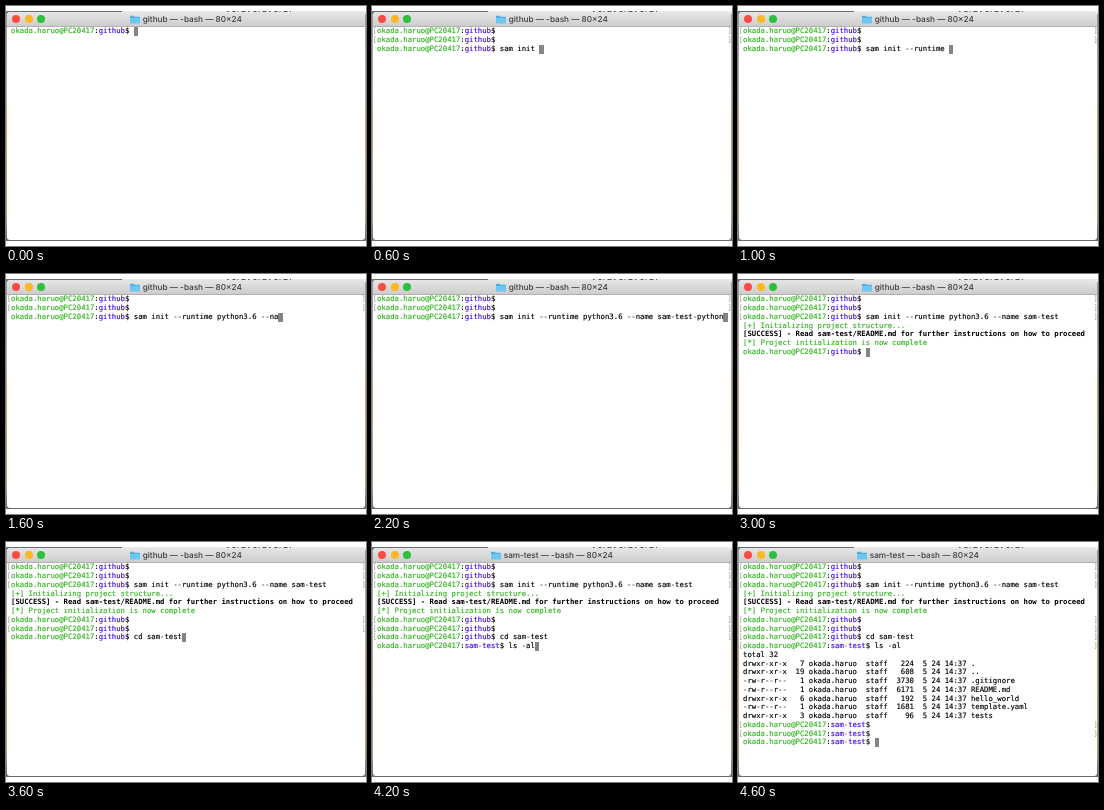
Recreate the animation shown at these times as an HTML page. Size 360 by 240 pixels, loop 4.8 s.

```html
<!DOCTYPE html>
<html lang="en">
<head>
<meta charset="utf-8">
<title>Terminal</title>
<style>
  html, body { margin: 0; width: 100%; height: 100%; overflow: hidden; background: #fff; }
  body { text-rendering: geometricPrecision; }
  div, p, svg { position: absolute; margin: 0; }
  #desk { left: 0; top: 5px; width: 360px; height: 230px;
    background: linear-gradient(#9a9a9a, #b3aca3 35%, #c2a27c 45%, #b59c7e 90%, #6d6a68 99%); }
  #strip { left: 0; top: 5px; width: 360px; height: 3px;
    background: linear-gradient(90deg, #6a6d70 116px, #e9e9e9 116px); }
  #win { left: 1px; top: 6px; width: 358px; height: 228px; background: #fff;
    border-radius: 3px; overflow: hidden; }
  #bar { left: 0; top: 0; width: 358px; height: 14px; border-bottom: .7px solid #b0b0b0;
    background: linear-gradient(#e6e6e6, #cdcdcd);
    display: flex; align-items: center; justify-content: center; gap: 2.5px;
    font: 500 8.2px Inter, Roboto, sans-serif; color: #3c3c3c; white-space: pre; }
  #bar svg { position: static; }
  .light { width: 8.4px; height: 8.4px; top: 2.8px; border-radius: 50%; }
  #term { left: 5px; top: 21.4px; width: 351.2px; color: #000;
    font: 7.292px/8.75px "DejaVu Sans Mono", monospace; white-space: pre;
    -webkit-text-stroke: .15px; }
  #term p { position: relative; height: 8.75px; }
  .done::before, .done::after { position: absolute; top: 0; color: #999; -webkit-text-stroke: 0; }
  .done::before { content: "["; left: -4.39px; }
  .done::after { content: "]"; left: 350.6px; }
  .g { color: #2fb41d; }
  .d { color: #400bd9; }
  #term b { -webkit-text-stroke: 0; }
  #term i { display: inline-block; width: 4.39px; height: 8.75px; vertical-align: top; background: #848484; }
</style>
</head>
<body>
<div id="desk"></div>
<div id="strip"></div>
<svg width="360" height="8" style="left:0;top:0">
  <path d="M221 5.6H285" stroke="#555" stroke-width="1.2" stroke-dasharray="1.5 4 3 2 1 3 4 2.5"/>
</svg>
<div id="win">
  <div id="bar">
    <div class="light" style="left:4.9px;background:#fb4b45"></div>
    <div class="light" style="left:17.5px;background:#fdb725"></div>
    <div class="light" style="left:30.1px;background:#2dc03c"></div>
    <svg width="10" height="9" viewBox="0 0 10 9">
      <path d="M0 1.5Q0 .8 .7 .8H3.6L4.6 1.8H9.3Q10 1.8 10 2.5V8.2H0Z" fill="#4fb0e0"/>
      <path d="M0 3H10V8.2H0Z" fill="#6cc8f2"/>
    </svg>
    <span id="title"></span>
  </div>
</div>
<div id="term"></div>
<script>
const STEP = 200, STEPS = 24;
const USER = 'okada.haruo', HOST = 'PC20417';
const COMMAND = 'sam init --runtime python3.6 --name sam-test-python';
const FILES = [
  ['drwxr-xr-x', 7, 224, '.'],
  ['drwxr-xr-x', 19, 608, '..'],
  ['-rw-r--r--', 1, 3730, '.gitignore'],
  ['-rw-r--r--', 1, 6171, 'README.md'],
  ['drwxr-xr-x', 6, 192, 'hello_world'],
  ['-rw-r--r--', 1, 1681, 'template.yaml'],
  ['drwxr-xr-x', 3, 96, 'tests'],
];
const term = document.getElementById('term');
const title = document.getElementById('title');

const green = s => `<span class="g">${s}</span>`;
const line = (s, cls = '') => `<p class="${cls}">${s}</p>`;
const prompt = (dir, cmd) => `${green(USER + '@' + HOST)}:<span class="d">${dir}</span>$ ${cmd}`;
const done = (dir, cmd = '') => line(prompt(dir, cmd), 'done');
const active = (dir, cmd = '') => line(prompt(dir, cmd) + '<i></i>');
const fileLine = ([mode, links, size, name]) => line(
  `${mode}  ${String(links).padStart(2)} ${USER}  staff  ${String(size).padStart(4)}  5 24 14:37 ${name}`);

// Letters of the command on screen: typed at two speeds, then partly deleted.
function typedLength(k) {
  if (k <= 8) return Math.round(9 + (k - 3) * 4.8);
  if (k <= 11) return 33 + (k - 8) * 6;
  return Math.max(44, 51 - (k - 11) * 4);
}

function screen(k) {
  const home = 'github', project = 'sam-test';
  if (k < 3) return active(home);
  let out = done(home) + done(home);
  const cmd = COMMAND.slice(0, typedLength(k));
  if (k < 14) return out + active(home, cmd);

  out += done(home, cmd) + line(green('[+] Initializing project structure...'));
  if (k < 15) return out + line('<i></i>');
  out += line('<b>[SUCCESS] - Read sam-test/README.md for further instructions on how to proceed</b>')
    + line(green('[*] Project initialization is now complete'));
  if (k < 16) return out + active(home);

  out += done(home) + done(home);
  if (k < 19) return out + active(home, 'cd sam-test'.slice(0, [0, 5, 11][k - 16]));
  out += done(home, 'cd sam-test');
  if (k < 22) return out + active(project, 'ls -al'.slice(0, (k - 19) * 5));

  out += done(project, 'ls -al') + line('total 32') + FILES.map(fileLine).join('');
  if (k < 23) return out + active(project);
  return out + done(project) + done(project) + active(project);
}

let shown = -1;
function draw() {
  const k = Math.floor(performance.now() / STEP) % STEPS;
  if (k !== shown) {
    shown = k;
    term.innerHTML = screen(k);
    title.textContent = `${k < 19 ? 'github' : 'sam-test'} — -bash — 80×24`;
  }
  requestAnimationFrame(draw);
}
draw();
</script>
</body>
</html>
```
